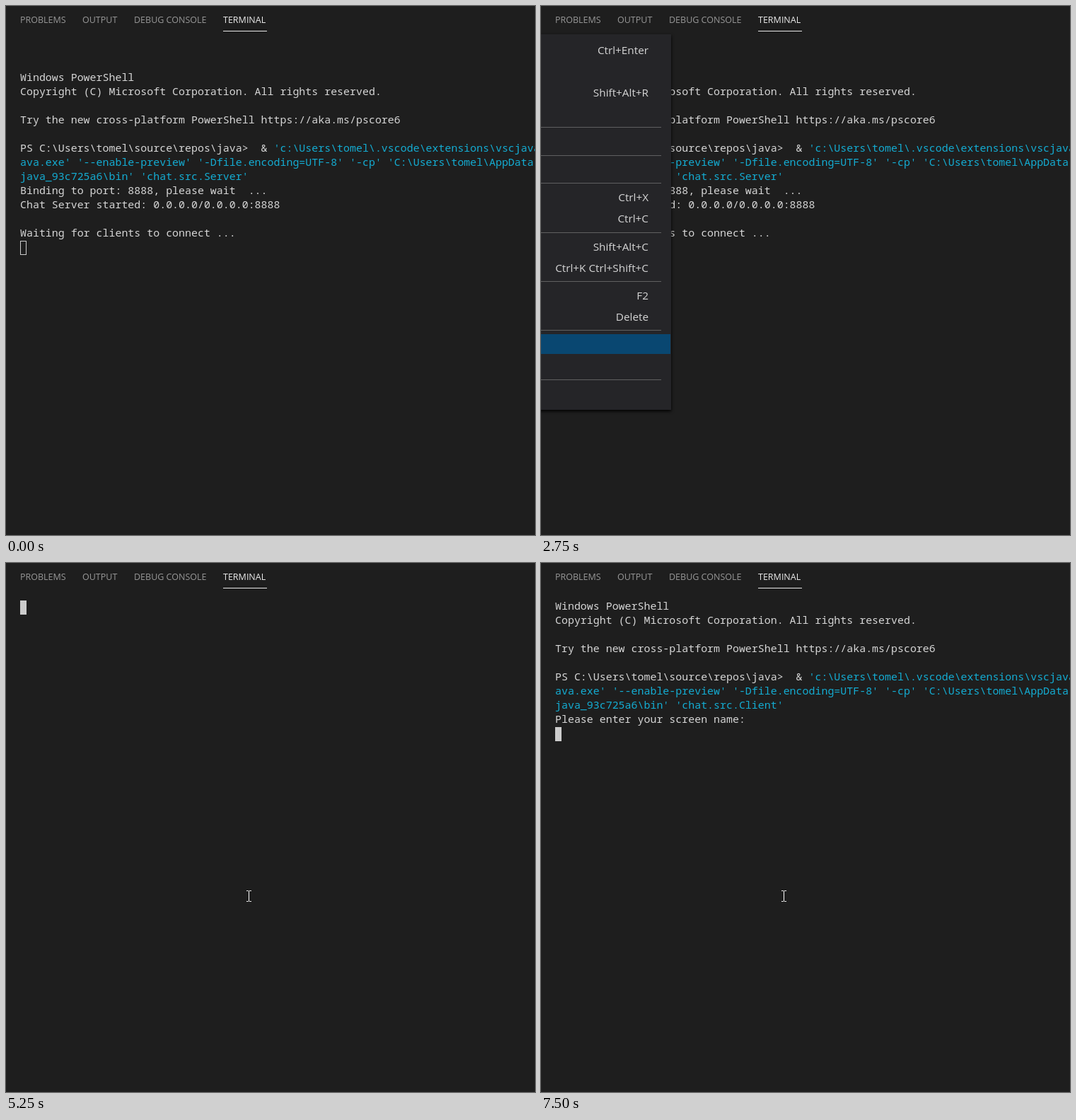
Recreate the animation shown at these times as an HTML page. Size 748 px wide and 748 px high, loop 8000 ms.

```html
<!DOCTYPE html>
<html lang="en">
<head>
<meta charset="utf-8">
<title>Terminal</title>
<style>
  html, body { margin: 0; width: 100%; height: 100%; overflow: hidden; background: #1e1e1e; }
  svg { display: block; width: 748px; height: 748px; }
  text { white-space: pre; fill: #d6d6d6; }
  .term text { font: 500 14.95px "Noto Sans Mono", monospace; }
  .term .arg { fill: #14acd2; }
  .tabs text { font: 500 12.5px "Open Sans", sans-serif; fill: #989898; }
  .tabs .on { fill: #ececec; }
  #menu { filter: drop-shadow(0 2px 2px #000); }
  #menu text { font: 500 15.3px "Open Sans", sans-serif; text-anchor: end; }
  #tip text { font: 13px "Open Sans", sans-serif; }
</style>
</head>
<body>
<svg viewBox="0 0 748 748">
  <g class="tabs">
    <text x="20" y="24">PROBLEMS</text>
    <text x="108" y="24">OUTPUT</text>
    <text x="181" y="24">DEBUG CONSOLE</text>
    <text x="307" y="24" class="on">TERMINAL</text>
    <rect x="307" y="35" width="62" height="1" fill="#e7e7e7"/>
  </g>
  <g class="term">
    <g id="server"></g>
    <g id="intro"></g>
    <g id="command"></g>
    <g id="ask"></g>
    <rect id="caret" x="20" width="9" height="20" fill="#ccc"/>
  </g>
  <g id="tip">
    <rect x="-1" y="52.5" width="102.5" height="27" fill="#252526" stroke="#454545"/>
    <text x="4" y="71">src\Client.java</text>
  </g>
  <g id="menu">
    <rect x="-10" y="40" width="194" height="531" fill="#252528"/>
    <rect id="hover" width="183" height="28" fill="#094771"/>
  </g>
  <path id="beam" d="M0 .5h3m1 0h3M3.5 1v14M0 15.5h3m1 0h3" fill="none" stroke="#fff"/>
</svg>
<script>
const $ = id => document.getElementById(id);

function add(parent, tag, attrs, content = '') {
  const el = document.createElementNS('http://www.w3.org/2000/svg', tag);
  for (const k in attrs) el.setAttribute(k, attrs[k]);
  el.textContent = content;
  parent.append(el);
  return el;
}

// Terminal rows; anything after a tab is drawn in the argument colour.
function print(parent, row, lines) {
  lines.forEach((line, i) => {
    const [plain, arg] = line.split('\t');
    const y = Math.round(66.4 + 19.94 * (row + i));
    const el = add(parent, 'text', { x: 20, y }, plain);
    if (arg) add(el, 'tspan', { class: 'arg' }, arg);
  });
}

const intro = [
  'Windows PowerShell',
  'Copyright (C) Microsoft Corporation. All rights reserved.',
  '',
  'Try the new cross-platform PowerShell https://aka.ms/pscore6'
];
const command = name => [
  String.raw`PS C:\Users\tomel\source\repos\java>  & ` + '\t' + String.raw`'c:\Users\tomel\.vscode\extensions\vscjava`,
  '\t' + String.raw`ava.exe' '--enable-preview' '-Dfile.encoding=UTF-8' '-cp' 'C:\Users\tomel\AppData` + '\\',
  '\t' + String.raw`java_93c725a6\bin' 'chat.src.` + name + "'"
];

print($('server'), 2, [
  ...intro, '', ...command('Server'),
  'Binding to port: 8888, please wait  ...',
  'Chat Server started: 0.0.0.0/0.0.0.0:8888',
  '',
  'Waiting for clients to connect ...'
]);
print($('intro'), 0, intro);
print($('command'), 5, command('Client'));
print($('ask'), 8, ['Please enter your screen name:']);

for (const y of [171, 211, 250, 320, 389, 458, 528])
  add($('menu'), 'rect', { x: 0, y, width: 170, height: 1, fill: '#606061' });
const keys = [
  [68, 'Ctrl+Enter'], [128, 'Shift+Alt+R'], [276, 'Ctrl+X'], [306, 'Ctrl+C'],
  [346, 'Shift+Alt+C'], [376, 'Ctrl+K Ctrl+Shift+C'], [415, 'F2'], [445, 'Delete']
];
for (const [y, key] of keys) add($('menu'), 'text', { x: 152, y }, key);

const show = (id, on) => $(id).style.display = on ? '' : 'none';

function setCaret(row, hollow) {
  const edge = hollow ? 0.5 : 0, attrs = {
    x: 20 + edge, y: Math.floor(53 + 19.94 * row) + edge,
    width: 9 - 2 * edge, height: 20 - 2 * edge,
    fill: hollow ? 'none' : '#ccc', stroke: hollow ? '#ccc' : 'none'
  };
  for (const k in attrs) $('caret').setAttribute(k, attrs[k]);
}

function draw(now) {
  const t = now % 8000;
  const during = (a, b) => t >= a && t < b;

  show('server', t < 5250);
  show('intro', t >= 5500);
  show('command', t >= 6000);
  show('ask', t >= 6250);
  setCaret(t < 5250 ? 14 : t < 5500 ? 0 : t < 6000 ? 5 : t < 6250 ? 8 : 9, t < 5250);

  show('tip', during(750, 1750));
  show('menu', during(1750, 3500));
  show('hover', during(2250, 2500) || during(2750, 3500));
  $('hover').setAttribute('y', t < 2500 ? 50 : 464);

  show('beam', t >= 3750);
  const [x, y] = t < 4000 ? [323, 467] : t < 4250 ? [339, 463] : [340, 463];
  $('beam').setAttribute('transform', `translate(${x} ${y})`);

  requestAnimationFrame(() => draw(performance.now() - start));
}

const start = performance.now();
draw(0);
</script>
</body>
</html>
```
